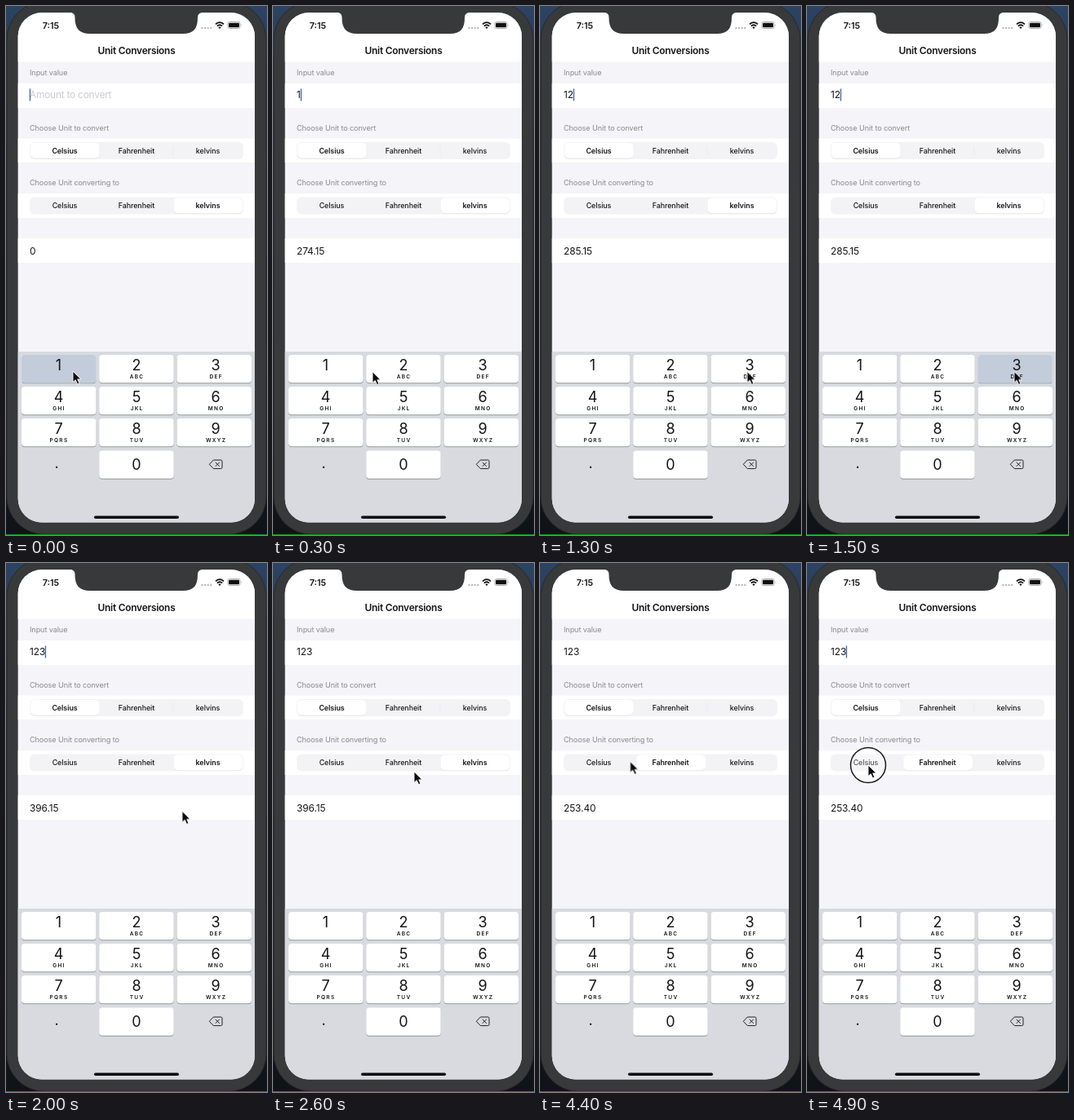
These frames come from a looping animation (320 px wide and 649 px high, 5 s). An HTML page:

```html
<!DOCTYPE html>
<html lang="en">
<head>
<meta charset="utf-8">
<title>Unit Conversions</title>
<style>
  html, body { margin: 0; width: 100%; height: 100%; overflow: hidden; background: #1b222e; }
  svg { display: block; width: 100%; height: 100%; }
  text { font-family: Inter, Roboto, sans-serif; fill: #151515; }
  .mid { text-anchor: middle; }
  .title { font-size: 11.9px; font-weight: 600; letter-spacing: -.23px; }
  .time { font-size: 10.8px; font-weight: 600; letter-spacing: 0; }
  .head { font-size: 9.1px; letter-spacing: -.09px; fill: #8a8a8f; }
  .body { font-size: 11.9px; letter-spacing: -.1px; }
  .hint { fill: #cbcbd1; letter-spacing: -.22px; }
  .seg { font-size: 8.9px; font-weight: 500; letter-spacing: -.06px; text-anchor: middle; }
  .on { font-weight: 600; }
  .num { font-size: 18px; text-anchor: middle; }
  .abc { font-size: 6.5px; font-weight: 600; letter-spacing: 1.3px; text-anchor: middle; }

  .anim { animation: 5s step-end -10ms infinite; }
  #typed { animation-name: typed; }
  #result { animation-name: result; }
  #caret { animation-name: caret; }
  #press { animation-name: press; }
  #ring { animation-name: ring; }
  #thumb { animation-name: thumb; }
  #toF { animation-name: bolden; }
  #toK { animation-name: lighten; }
  #pointer { animation-name: pointer; }

  /* Each line of a strip sits 30px below the one before */
  @keyframes typed {
    0% { transform: translateY(0); }
    2% { transform: translateY(-30px); }
    16% { transform: translateY(-60px); }
    32%, 100% { transform: translateY(-90px); }
  }
  @keyframes result {
    0% { transform: translateY(0); }
    2% { transform: translateY(-30px); }
    16% { transform: translateY(-60px); }
    32% { transform: translateY(-90px); }
    76%, 100% { transform: translateY(-120px); }
  }
  @keyframes caret {
    0% { transform: translateX(0); opacity: 1; }
    2% { transform: translateX(5px); opacity: 1; }
    16% { transform: translateX(12px); opacity: 1; }
    32% { transform: translateX(19px); opacity: 1; }
    48%, 68%, 88% { transform: translateX(19px); opacity: 0; }
    58%, 78%, 98%, 100% { transform: translateX(19px); opacity: 1; }
  }
  @keyframes press {
    0% { transform: translateX(0); opacity: 1; }
    2% { transform: translateX(0); opacity: 0; }
    12% { transform: translateX(95px); opacity: 1; }
    16% { transform: translateX(95px); opacity: 0; }
    30% { transform: translateX(190.5px); opacity: 1; }
    32%, 100% { transform: translateX(190.5px); opacity: 0; }
  }
  @keyframes ring {
    0%, 12%, 30%, 75% { opacity: 0; }
    10%, 28%, 72%, 98%, 100% { opacity: 1; }
  }
  @keyframes thumb {
    0% { transform: translateX(0); }
    76% { transform: translateX(0); animation-timing-function: steps(3); }
    82%, 100% { transform: translateX(-87.5px); }
  }
  @keyframes bolden { 0% { font-weight: 500; } 78%, 100% { font-weight: 600; } }
  @keyframes lighten { 0% { font-weight: 600; } 78%, 100% { font-weight: 500; } }
  @keyframes pointer {
    0% { transform: translate(82px, 448px); }
    2% { transform: translate(82px, 448px); animation-timing-function: steps(4); }
    10% { transform: translate(162px, 449.5px); }
    16% { transform: translate(162px, 449.5px); animation-timing-function: steps(4); }
    24% { transform: translate(254px, 448.5px); }
    32% { transform: translate(254px, 448.5px); animation-timing-function: steps(4); }
    40% { transform: translate(216px, 304.5px); animation-timing-function: steps(5); }
    50% { transform: translate(178px, 260px); animation-timing-function: steps(3); }
    56% { transform: translate(163px, 247.5px); }
    82% { transform: translate(163px, 247.5px); animation-timing-function: steps(3); }
    88% { transform: translate(110.5px, 243.5px); animation-timing-function: steps(3); }
    94%, 100% { transform: translate(75px, 248px); }
  }
</style>
</head>
<body>
<svg viewBox="0 0 320 649" preserveAspectRatio="none">
  <defs>
    <linearGradient id="desk" x2="0" y2="1">
      <stop stop-color="#2c4363"/>
      <stop offset=".2" stop-color="#26344b"/>
      <stop offset=".5" stop-color="#1c222e"/>
      <stop offset="1" stop-color="#0f1318"/>
    </linearGradient>
    <clipPath id="screen"><rect x="14.700" y="8.300" width="290.300" height="625.200" rx="29"/></clipPath>
    <clipPath id="inRow"><rect x="14" y="95" width="292" height="30"/></clipPath>
    <clipPath id="outRow"><rect x="14" y="285" width="292" height="30"/></clipPath>
    <g id="key">
      <rect y="1" width="91.500" height="34.300" rx="4" fill="#95979c"/>
      <rect width="91.500" height="34.300" rx="4" fill="#fff"/>
    </g>
    <g id="row">
      <use href="#key" x="19"/>
      <use href="#key" x="114.200"/>
      <use href="#key" x="209.500"/>
    </g>
  </defs>

  <rect width="320" height="649" fill="url(#desk)"/>
  <rect x="1" y="-5" width="318" height="653" rx="46" fill="#38393a" stroke="#29292b"/>
  <rect y="648" width="320" height="1" fill="#128a1c"/>

  <g clip-path="url(#screen)">
    <rect x="14" y="8" width="292" height="626" fill="#f5f4f9"/>
    <path fill="#fff" d="M14 8h292v60.500h-292zM14 95h292v30h-292zM14 162.500h292v29.500h-292zM14 230h292v30h-292zM14 285h292v30h-292z"/>

    <!-- Status bar -->
    <text class="time mid" x="55" y="27.800">7:15</text>
    <path d="M239.500 27h13" stroke="#b5b5b8" stroke-width="2" stroke-dasharray="2 1.600"/>
    <g fill="none" stroke="#111" stroke-width="1.700">
      <path d="M257 22.300q5 -4.300 10 0"/>
      <path d="M258.800 24.600q3.200 -2.700 6.400 0"/>
    </g>
    <path d="M260.300 26.200q1.700 -1.300 3.400 0l-1.700 1.900z" fill="#111"/>
    <rect x="271.800" y="19.500" width="15.400" height="8" rx="2.300" fill="none" stroke="#9b9b9e" stroke-width=".8"/>
    <rect x="273" y="20.700" width="13" height="5.600" rx="1.300" fill="#111"/>
    <path d="M288.200 22.200q1.300 1.300 0 2.600z" fill="#9b9b9e"/>

    <text class="title mid" x="160" y="58.500">Unit Conversions</text>
    <text class="head" x="29" y="85.300">Input value</text>
    <text class="head" x="29" y="152.800">Choose Unit to convert</text>
    <text class="head" x="29" y="220.300">Choose Unit converting to</text>

    <!-- Input field -->
    <g clip-path="url(#inRow)">
      <g id="typed" class="anim">
        <text class="body hint" x="29" y="113.300">Amount to convert</text>
        <text class="body" x="29" y="143.300">1</text>
        <text class="body" x="29" y="173.300">12</text>
        <text class="body" x="29" y="203.300">123</text>
      </g>
    </g>
    <rect id="caret" class="anim" x="28.800" y="101.500" width="1.300" height="15" fill="#3f63ad"/>

    <!-- Unit pickers -->
    <rect x="29" y="167" width="262" height="21" rx="6" fill="#f3f3f6"/>
    <rect x="30" y="168.800" width="84.500" height="18.700" rx="5" fill="#e2e2e6"/>
    <rect x="30" y="168" width="84.500" height="18.700" rx="5" fill="#fff"/>
    <path d="M205 172v11" stroke="#e9e9ed" stroke-width=".8"/>
    <text class="seg on" x="72" y="180.500">Celsius</text>
    <text class="seg" x="160" y="180.500">Fahrenheit</text>
    <text class="seg" x="247.500" y="180.500">kelvins</text>

    <rect x="29" y="234.500" width="262" height="21" rx="6" fill="#f3f3f6"/>
    <g id="thumb" class="anim">
      <rect x="205.500" y="236.300" width="84.500" height="18.700" rx="5" fill="#e2e2e6"/>
      <rect x="205.500" y="235.500" width="84.500" height="18.700" rx="5" fill="#fff"/>
    </g>
    <text class="seg" x="72" y="248.200">Celsius</text>
    <text id="toF" class="seg anim" x="160" y="248.200">Fahrenheit</text>
    <text id="toK" class="seg anim" x="247.500" y="248.200">kelvins</text>

    <!-- Result -->
    <g clip-path="url(#outRow)">
      <g id="result" class="anim">
        <text class="body" x="29" y="304.500">0</text>
        <text class="body" x="29" y="334.500">274.15</text>
        <text class="body" x="29" y="364.500">285.15</text>
        <text class="body" x="29" y="394.500">396.15</text>
        <text class="body" x="29" y="424.500">253.40</text>
      </g>
    </g>

    <!-- Keypad -->
    <rect x="14" y="424" width="292" height="210" fill="#d8dae0"/>
    <use href="#row" y="428"/>
    <use href="#row" y="467"/>
    <use href="#row" y="506"/>
    <use href="#key" x="114.200" y="545.500"/>
    <rect id="press" class="anim" x="19" y="428" width="91.500" height="34.300" rx="4" fill="#c3ccdb"/>
    <g class="num">
      <text x="64.500" y="446.700">1</text><text x="160" y="446.700">2</text><text x="257" y="446.700">3</text>
      <text x="64.500" y="486.200">4</text><text x="160" y="486.200">5</text><text x="257" y="486.200">6</text>
      <text x="64.500" y="525.400">7</text><text x="160" y="525.400">8</text><text x="257" y="525.400">9</text>
      <text x="62" y="567">.</text><text x="160" y="568.800">0</text>
    </g>
    <g class="abc">
      <text x="160.600" y="456.800">ABC</text><text x="257.600" y="456.800">DEF</text>
      <text x="65" y="496">GHI</text><text x="160.600" y="496">JKL</text><text x="257.600" y="496">MNO</text>
      <text x="65" y="535.200">PQRS</text><text x="160.600" y="535.200">TUV</text><text x="257.600" y="535.200">WXYZ</text>
    </g>
    <path d="M249.300 562.300l5 -5.300h9.200q1.500 0 1.500 1.500v7.600q0 1.500 -1.500 1.500h-9.200zM256.800 559.800l5 5m0 -5l-5 5"
      fill="none" stroke="#222" stroke-width="1" stroke-linejoin="round"/>
    <rect x="108" y="625.600" width="104" height="3.400" rx="1.700" fill="#0a0a0a"/>
  </g>

  <path fill="#38393a" d="M78 7.800Q84.500 8 84.500 14C84.500 28 90 34 103 34H217C230 34 235 28 235 14Q235 8 242 7.800z"/>

  <g id="pointer" class="anim">
    <circle id="ring" class="anim" r="21.500" fill="#fff" fill-opacity=".28" stroke="#1a1a1a" stroke-width="1.500"/>
    <path d="M0 0V13.600L3.200 10.700L5.500 15.800L7.900 14.700L5.700 9.900H10z" fill="#0a0a0a" stroke="#fff" stroke-width=".9"/>
  </g>
</svg>
</body>
</html>
```
